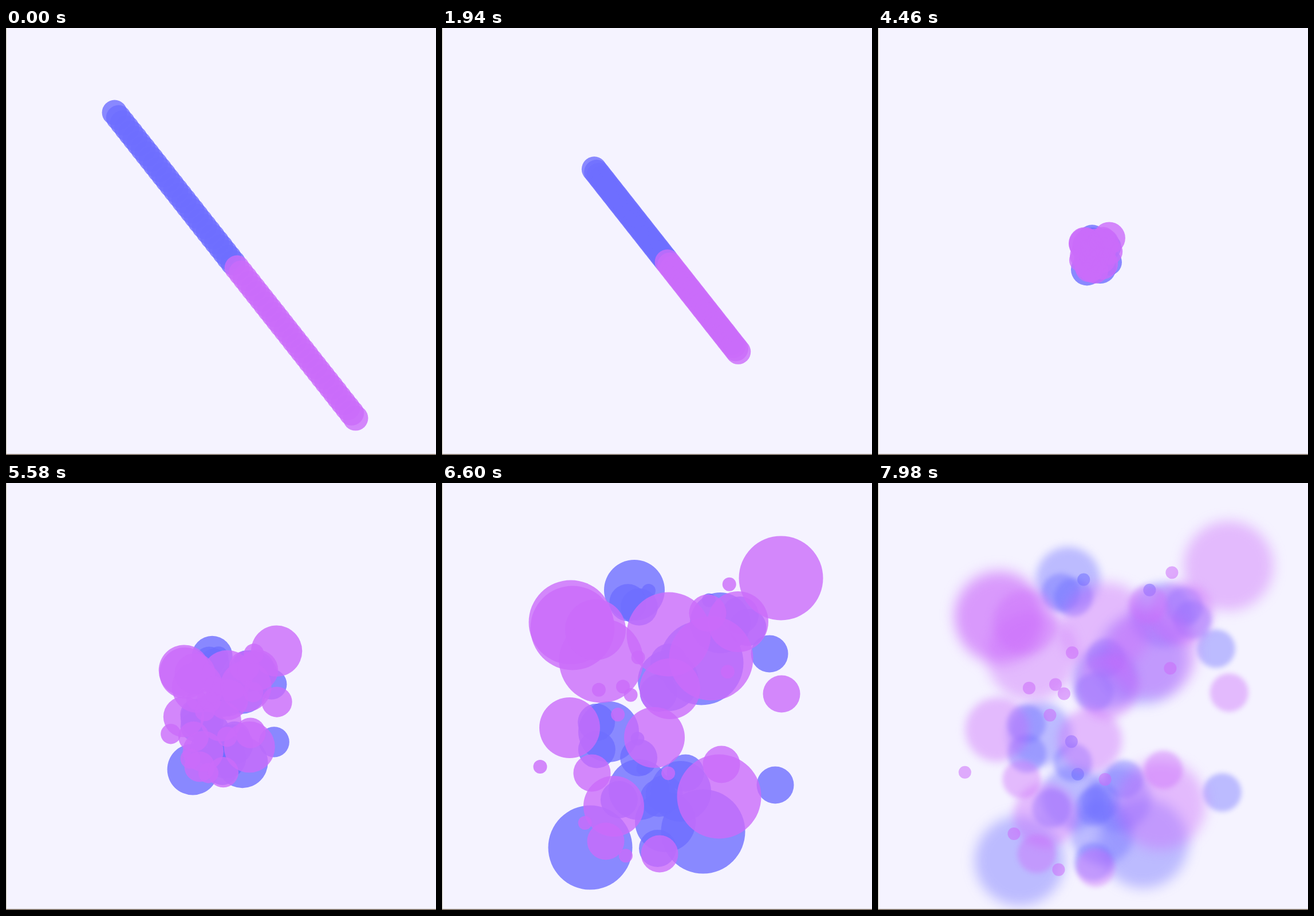
Write an HTML page that moves like this. It is 751 px wide and 745 px high and loops after 8000 ms.

```html
<!DOCTYPE html>
<html lang="en">
<head>
<meta charset="utf-8">
<title>Particle burst</title>
<style>
  html, body { margin: 0; width: 100%; height: 100%; overflow: hidden; background: #f5f3ff; }
  svg { display: block; width: 100vw; height: 100vh; }
</style>
</head>
<body>
<svg viewBox="0 0 751 745">
  <defs id="defs"></defs>
  <rect width="751" height="745" fill="#f5f3ff"/>
  <g id="dots"></g>
  <rect width="1" height="745" fill="#c8c5b4"/>
  <rect y="743.4" width="751" height="1.6" fill="#76685a"/>
</svg>
<script>
const LOOP = 8000, CX = 379, CY = 393, START_R = 22, PER_COLOR = 30;
const radius = level => 12 + 20.5 * level;   // levels 0 to 3
const LEVELS = [3, 2, 1, 0];

// Key points of the burst as "x,y"; smaller dots are scattered around the mid ones.
const SETS = [
  {
    fill: '#6f6eff', satellite: 1, tiny: 4, reach: [22, 58],
    big: [[259, 636], [456, 608], [453, 314]],
    mid: [[336, 187], [486, 244], [291, 434], [344, 535], [417, 538], [390, 591], [395, 345]],
    small: [[572, 298], [582, 527]]
  },
  {
    fill: '#cb6cfa', satellite: 0, tiny: 0, reach: [40, 95],
    big: [[592, 166], [225, 243], [228, 253], [278, 310], [396, 264], [470, 306], [484, 547]],
    mid: [[517, 242], [398, 359], [223, 427], [371, 444], [300, 564], [268, 256]],
    small: [[593, 368], [262, 506], [286, 625], [380, 647], [488, 491], [464, 227]]
  }
];

const clamp = v => Math.max(0, Math.min(1, v));
const mix = (a, b, k) => a + (b - a) * k;

let seed = 7;
const random = () => {
  const v = Math.sin(++seed * 127.1) * 43758.5453;
  return v - Math.floor(v);
};

const el = (tag, parent, attrs = {}) => {
  const node = document.createElementNS('http://www.w3.org/2000/svg', tag);
  for (const k in attrs) node.setAttribute(k, attrs[k]);
  return parent.appendChild(node);
};

const defs = document.getElementById('defs'), root = document.getElementById('dots');
const blurs = LEVELS.map(level => el('feGaussianBlur', el('filter', defs, {
  id: 'blur' + level, filterUnits: 'userSpaceOnUse', x: -60, y: -60, width: 871, height: 865,
  'color-interpolation-filters': 'sRGB'
}), { stdDeviation: 0 }));

function place(set) {
  const at = (points, level) => points.map(([x, y]) => ({ x, y, level }));
  const list = [...at(set.big, 3), ...at(set.mid, 2), ...at(set.small, 1)];
  const spare = PER_COLOR - list.length;
  for (let i = 0; i < spare; i++) {
    const [x, y] = set.mid[i % set.mid.length];
    const angle = random() * 2 * Math.PI, dist = mix(...set.reach, random());
    const level = i < spare - set.tiny ? set.satellite : 0;
    list.push({ x: x + dist * Math.cos(angle), y: y + dist * Math.sin(angle), level });
  }
  return list;
}

const groups = [], dots = [];
SETS.forEach((set, s) => {
  const layer = LEVELS.map(level => {
    const g = el('g', root, { fill: set.fill });
    groups.push({ g, level });
    return g;
  });
  place(set).forEach((p, i) => {
    const u = (s * PER_COLOR + i) / (2 * PER_COLOR - 1);   // place along the line
    dots.push({
      node: el('circle', layer[LEVELS.indexOf(p.level)]),
      lx: mix(-189, 231, u), ly: mix(-245, 287, u),
      bx: p.x - CX, by: p.y - CY, r: radius(p.level)
    });
  });
});

function render(ms) {
  const t = ms / 1000;
  const line = Math.max(0, 1.016 - 0.155 * (t - 0.3) ** 2);
  const grow = clamp((t - 2.9) / 3.7) ** 2.6;
  const fade = 1 - (1 - clamp((t - 6.6) / 1.4)) ** 2;
  const burst = 0.012 * clamp((t - 2.5) / 0.4) + 0.988 * grow + 0.095 * fade;

  for (const d of dots) {
    d.node.setAttribute('cx', (CX + d.lx * line + d.bx * burst).toFixed(2));
    d.node.setAttribute('cy', (CY + d.ly * line + d.by * burst).toFixed(2));
    d.node.setAttribute('r', mix(START_R, d.r, burst).toFixed(2));
  }

  // Bigger dots blur more, as if closer to the lens.
  LEVELS.forEach((level, i) =>
    blurs[i].setAttribute('stdDeviation', (fade * (0.6 + 3.5 * level)).toFixed(2)));
  for (const { g, level } of groups) {
    g.setAttribute('fill-opacity', mix(0.8, level ? 0.42 : 0.54, fade).toFixed(3));
    if (fade > 0) g.setAttribute('filter', `url(#blur${level})`);
    else g.removeAttribute('filter');
  }
}

const begin = performance.now();
function tick() {
  render((performance.now() - begin) % LOOP);
  requestAnimationFrame(tick);
}
render(0);
requestAnimationFrame(tick);
</script>
</body>
</html>
```
